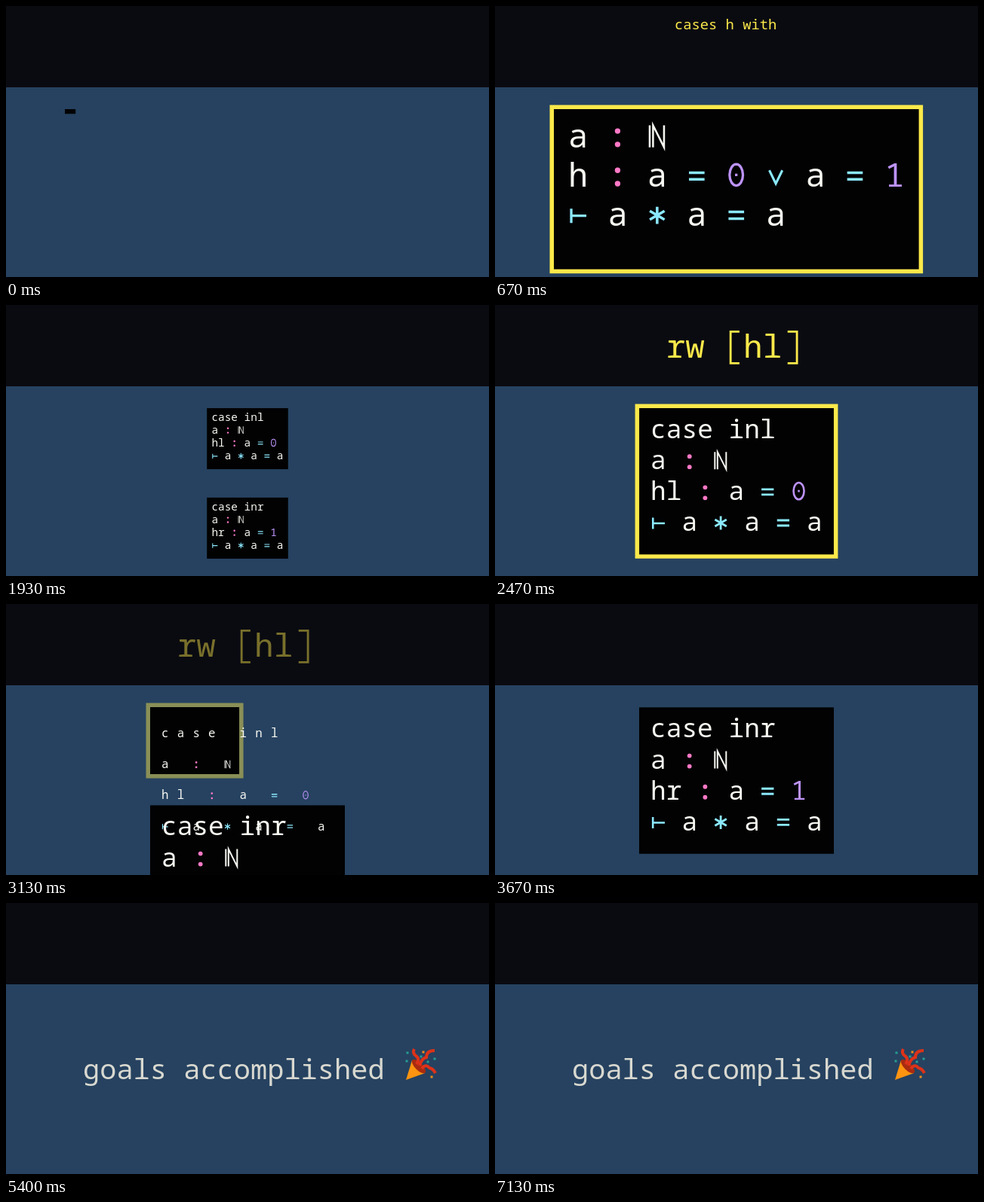
An HTML page with a canvas that plays this animation: 640x360 px, repeating every 7200 ms.

```html
<!DOCTYPE html>
<html lang="en">
<head>
<meta charset="utf-8">
<title>Proof by cases</title>
<style>
html, body { margin: 0; height: 100%; overflow: hidden; background: #264260; }
canvas { display: block; width: 100vw; height: 100vh; }
</style>
</head>
<body>
<canvas id="stage" width="640" height="360"></canvas>
<script>
const ctx = document.getElementById('stage').getContext('2d');
const LOOP = 7.2, MONO = '"Noto Sans Mono", "DejaVu Sans Mono", monospace';
const ADV = 20.7, LINE = 41.2, PAD = 15, BASE = 40, EM = ADV / 0.6;
const TOP = 137, STEP = 285, GOAL_W = 258, GOAL_H = 194.5;
const START = { x: 78, y: TOP, s: 1.266, w: 382, h: 168 };
const PAIR_SCALE = 0.385;
const BLUE = '#264260', BAND = '#0a0b11', BOX = '#020203';
const WHITE = '#f8f8f2', YELLOW = '#fce94a', CYAN = '#8be9fd', PINK = '#ff79c6', PURPLE = '#bd93f9';

const mix = (a, b, p) => a + (b - a) * p;

// exponential ease in and out around a middle time
function ease(t, middle, length) {
  const x = (t - middle) / length + 0.5;
  if (x <= 0) return 0;
  if (x >= 1) return 1;
  return x < 0.5 ? 2 ** (20 * x - 10) / 2 : 1 - 2 ** (10 - 20 * x) / 2;
}

function tint(c) {
  if (c === ':') return PINK;
  if ('=*⊢∨'.includes(c)) return CYAN;
  return c === '0' || c === '1' ? PURPLE : WHITE;
}

// glyphs of a goal: text, column and row
const parse = lines => lines.flatMap((line, row) =>
  [...line].map((c, col) => ({ c, col, row })).filter(g => g.c !== ' '));

const first = parse(['a : ℕ', 'h : a = 0 ∨ a = 1', '⊢ a * a = a']);
const left = parse(['case inl', 'a : ℕ', 'hl : a = 0', '⊢ a * a = a']);
const right = parse(['case inr', 'a : ℕ', 'hr : a = 1', '⊢ a * a = a']);

const leaving = list => list.map(from => ({ from }));
const entering = list => list.map(to => ({ to }));

// pairs each glyph of the first goal with its place in a case goal
function morph(goal, digitCol) {
  const rest = new Set(goal);
  const moves = first.map(from => {
    let col = from.col;
    if (from.row === 1) {
      if (col === digitCol) col = 9;
      else if (col > 6) col = -1;
      else if (col > 0) col++;
    }
    const to = goal.find(g => g.row === from.row + 1 && g.col === col);
    rest.delete(to);
    return { from, to };
  });
  return moves.concat(entering([...rest]));
}

const toLeft = morph(left, 8), toRight = morph(right, 16);

// symbols drawn as strokes on a cell 20.7 wide: line width and path
const SHAPES = {
  '*': [2.8, 'M10.3 -20V-2M2.6 -15.5L18 -6.5M2.6 -6.5L18 -15.5'],
  '⊢': [2.6, 'M3.2 -18V-3M3.2 -10.5H19'],
  '=': [2.8, 'M2.2 -14.5H18.5M2.2 -7.5H18.5'],
  '∨': [2.4, 'M3.5 -17L10.3 -3L17.1 -17'],
  'ℕ': [2, 'M2.5 0V-23M6 0V-23L17.5 0V-23'],
  '[': [2.3, 'M16.5 -28H7V6H16.5'],
  ']': [2.3, 'M6 -28H16V6H6'],
  '0': [2.6, 'M10.3 -23.4a7 11.2 0 0 1 0 22.4a7 11.2 0 0 1 0 -22.4M9 -12.2h2.6']
};
for (const shape of Object.values(SHAPES)) shape[1] = new Path2D(shape[1]);

function dot(x, y, r) {
  ctx.beginPath();
  ctx.arc(x, y, r, 0, 7);
  ctx.fill();
}

function glyph(c, x, y, k, color) {
  if (k < 0.05) return;
  ctx.save();
  ctx.translate(x, y);
  ctx.scale(k, k);
  ctx.fillStyle = ctx.strokeStyle = color;
  if (c in SHAPES) {
    ctx.lineWidth = SHAPES[c][0];
    ctx.stroke(SHAPES[c][1]);
  } else if (c === ':') {
    dot(10.3, -3, 2.9);
    dot(10.3, -17, 2.9);
  } else {
    ctx.font = `${EM}px ${MONO}`;
    ctx.fillText(c, 0, 0);
  }
  ctx.restore();
}

function drawGlyphs(box, moves, q) {
  for (const { from, to } of moves) {
    const a = from || to, b = to || from;
    const size = !from ? q : !to ? 1 - q : 1;
    glyph(a.c,
      box.x + box.s * (PAD + ADV * mix(a.col, b.col, q)),
      box.y + box.s * (BASE + LINE * mix(a.row, b.row, q)),
      box.s * size, tint(a.c));
  }
}

// frames lie under all boxes, boxes under all text
function drawGoals(goals, glow) {
  const path = new Path2D();
  for (const { box: b, framed } of goals) {
    if (framed && b.w > 0.5) path.rect(b.x - 5.5, b.y - 5.5, b.s * b.w + 11, b.s * b.h + 11);
  }
  ctx.globalAlpha = glow;
  ctx.fillStyle = YELLOW;
  ctx.fill(path);
  ctx.globalAlpha = 1;
  ctx.fillStyle = BOX;
  for (const { box: b } of goals) ctx.fillRect(b.x, b.y, b.s * b.w, b.s * b.h);
  for (const { box, moves, q } of goals) drawGlyphs(box, moves, q);
}

function write(text, x, y, pitch, color) {
  [...text].forEach((c, i) => glyph(c, x + i * pitch, y, pitch / ADV, color));
}

function tactic(t, since, alpha, lines, x, y, pitch, gap) {
  let count = Math.floor((t - since) * 115);
  ctx.globalAlpha = alpha;
  lines.forEach((line, row) => {
    write(line.slice(0, Math.max(0, count)), x, y + row * gap, pitch, YELLOW);
    count -= line.length;
  });
  ctx.globalAlpha = 1;
}

const rewrite = (t, since, alpha, name) =>
  tactic(t, since, alpha, [`rw [${name}]`], 226.7, 70, 25.6, 0);

const caseBox = (s, y, size = 1) =>
  ({ x: 320 - GOAL_W / 2 * s, y, s, w: GOAL_W * size, h: GOAL_H * size });

function split(t) {
  const grow = ease(t, 0.135, 0.66);
  const p = ease(t, 1.344, 0.9), q = ease(t, 1.41, 0.9);
  if (t < 0.95) {
    const box = { ...START, w: START.w * grow, h: START.h * grow };
    drawGoals([{ box, moves: entering(first), q: grow, framed: t >= 0.57 }], 1);
  } else {
    const place = y => {
      const end = caseBox(PAIR_SCALE, y), box = {};
      for (const key of ['x', 'y', 's']) box[key] = mix(START[key], end[key], p);
      for (const key of ['w', 'h']) box[key] = mix(START[key], end[key], q);
      return box;
    };
    drawGoals([
      { box: place(TOP), moves: toLeft, q, framed: true },
      { box: place(TOP + STEP * PAIR_SCALE), moves: toRight, q, framed: true }
    ], 1 - q);
  }
  tactic(t, 0.56, 1 - q,
    ['cases h with', '| inl hl => ?_', '| inr hr => ?_'], 238, 31, 11.27, 32.6);
}

function solve(t) {
  const s = mix(PAIR_SCALE, 1, ease(t, 2.077, 0.9));
  const q1 = ease(t, 3.122, 1.25), q2 = ease(t, 4.655, 1.25);
  const typed1 = 2.35, typed2 = 3.88;
  drawGoals([
    { box: caseBox(s, TOP, 1 - q1), moves: leaving(left), q: q1, framed: t >= typed1 },
    { box: caseBox(s, TOP + STEP * s * (1 - q1), 1 - q2), moves: leaving(right), q: q2, framed: t >= typed2 }
  ], t < typed2 ? 1 - q1 : 1 - q2);
  if (t < typed2) rewrite(t, typed1, 1 - q1, 'hl');
  else rewrite(t, typed2, 1 - q2, 'hr');
}

function popper() {
  ctx.fillStyle = '#ff9410';
  ctx.fill(new Path2D('M530 235L538 209Q550 214 555 226Z'));
  ctx.fillStyle = '#a82b10';
  ctx.beginPath();
  ctx.ellipse(547, 217, 12, 5, 0.8, 0, 7);
  ctx.fill();
  ctx.strokeStyle = '#dc3219';
  ctx.lineWidth = 4;
  ctx.stroke(new Path2D('M544 214Q549 207 543 203Q538 199 541 194' +
    'M548 216Q551 206 557 205Q557 196 568 196M551 220Q556 213 561 219Q566 220 569 226'));
  const bits = [[532, 199], [531, 210], [553, 198], [559, 211], [568, 207], [564, 231], [550, 204]];
  bits.forEach(([x, y], i) => {
    ctx.fillStyle = i % 3 === 2 ? '#f08a18' : i === 5 ? '#d63424' : '#249d92';
    ctx.fillRect(x - 1.5, y - 1.5, 3, 3);
  });
}

function finish() {
  write('goals accomplished', 102, 233.5, 22.2, '#d8d8d0');
  popper();
}

function draw(now) {
  const t = now / 1000 % LOOP;
  ctx.fillStyle = BLUE;
  ctx.fillRect(0, 0, 640, 360);
  ctx.fillStyle = BAND;
  ctx.fillRect(0, 0, 640, 108);
  if (t < 1.8) split(t);
  else if (t < 5.28) solve(t);
  else if (t >= 5.39) finish();
}

let began;
function tick(now) {
  began ??= now;
  draw(now - began);
  requestAnimationFrame(tick);
}
requestAnimationFrame(tick);
</script>
</body>
</html>
```
